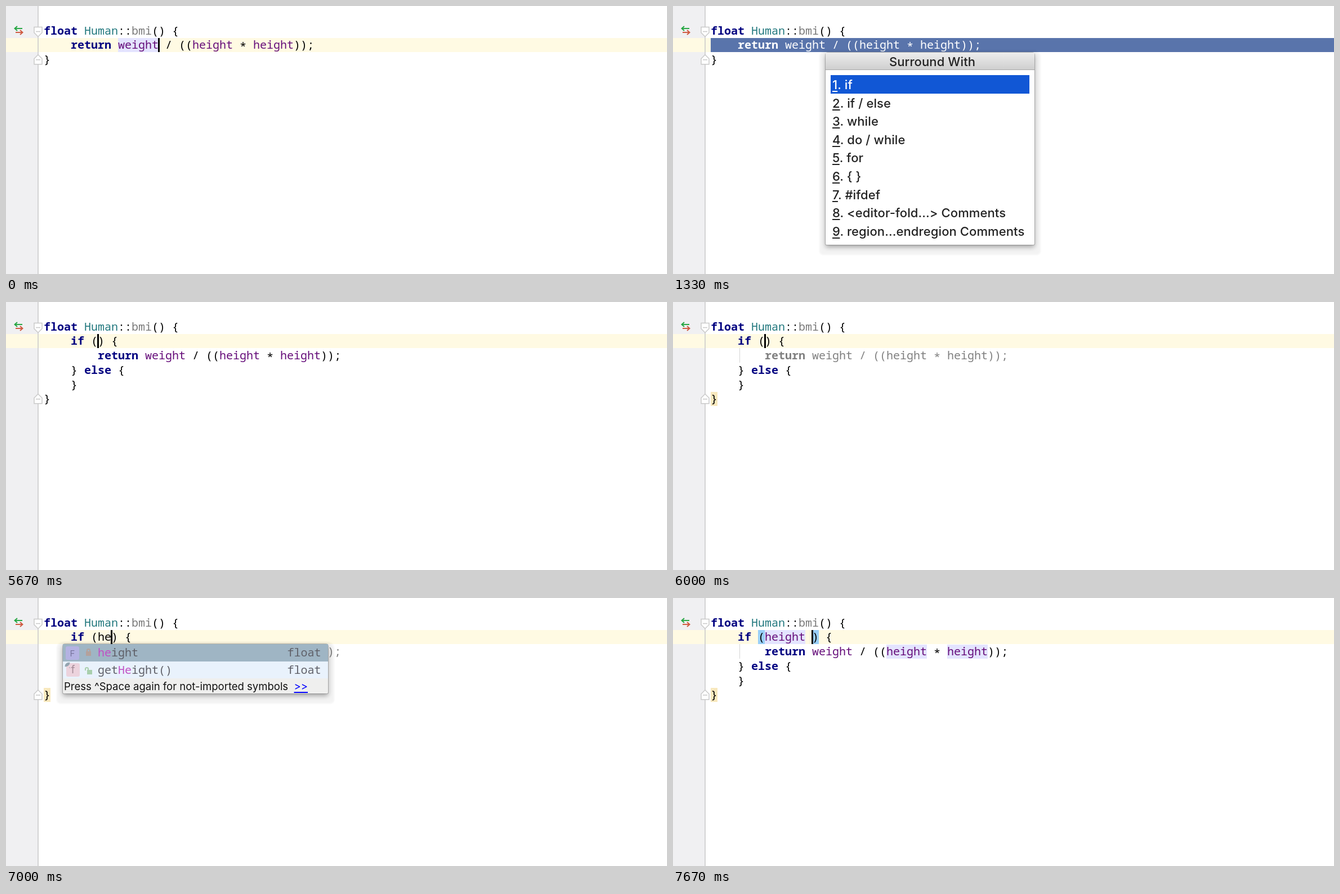
Animation, 1174 px wide and 477 px high, one loop 8 s. Source, as an HTML page:

```html
<!DOCTYPE html>
<html lang="en">
<head>
<meta charset="utf-8">
<title>Surround with if / else</title>
<style>
  html, body { margin: 0; width: 100%; height: 100%; overflow: hidden; background: #fff; }
  #stage { position: relative; width: 1174px; height: 477px; overflow: hidden; }
  #stage div, #stage svg { position: absolute; }
  .code { font: 500 20px/26px "Noto Sans Mono", monospace; white-space: pre; color: #000; }
  .ui { font: 500 22px/32px Inter, sans-serif; letter-spacing: .1px; white-space: pre; color: #222; }
  .note { font: 18.5px/28px Inter, sans-serif; white-space: pre; color: #111; }
  b { font-weight: 700; color: #000080; }
  .class { color: #20777d; }
  .name { color: #7a7a7a; }
  .field { color: #660e7a; }
  .times { position: relative; top: 3px; }
  .dead, .dead * { color: #808080; }
  .selected, .selected * { color: #fff; }
  .popup { box-shadow: 0 0 0 1px #0003, 0 4px 9px #0005, 0 7px 3px 11px #0000000c; border-radius: 4px 4px 2px 2px; }
  .title { background: linear-gradient(#ededed, #cfcfcf); border-bottom: 1px solid #a8a8a8; text-align: center; }
  .hint { color: #5f6068; }
  .hint i { font-style: normal; color: #c050c4; }
  u { text-underline-offset: 3px; text-decoration-thickness: 2px; }
</style>
</head>
<body>
<div id="stage"></div>
<script>
const LEFT = 67, CELL = 12, TOP = 31.3, PITCH = 25.7;
const rowTop = row => TOP + row * PITCH;

const box = (x, y, w, h, fill, inner = '', cls = '') =>
  `<div class="${cls}" style="left:${x}px;top:${y}px;width:${w}px;height:${h}px;background:${fill}">${inner}</div>`;
const text = (x, y, html, cls) => `<div class="${cls}" style="left:${x}px;top:${y}px">${html}</div>`;
const line = (row, html, cls = '') => text(LEFT, rowTop(row) - .6, html, 'code ' + cls);
const mark = (row, col, len, fill) => box(LEFT + col * CELL, Math.round(rowTop(row)), len * CELL, 25, fill);
const caret = col => box(LEFT + col * CELL - 1.5, 57, 3, 25, '#000');
const field = name => `<span class="field">${name}</span>`;

const fold = (y, flip) =>
  `<g transform="translate(57 ${y}) scale(1 ${flip})" fill="#fff" stroke="#c9c9c9" stroke-width="1.5">
    <path d="M-7-8H7V2L0 9L-7 2Z"/><path d="M-4 0H4"/></g>`;

const gutter = endRow => `<svg width="1174" height="477">
  <path d="M57 0V477" stroke="#cbcbcb" stroke-width="1.6"/>
  ${fold(45.5, 1)}${fold(rowTop(endRow) + 13, -1)}
  <g fill="none" stroke-width="2">
    <path d="M29 40H16M20 36L15.5 40L20 44" stroke="#28a745"/>
    <path d="M17 47H29M25 43L29.5 47L25 51" stroke="#cf5b42"/>
  </g></svg>`;

const frame = (endRow, body, selected) =>
  box(0, 0, 57, 477, '#f0f0f2') + box(0, 57, 1174, 25, '#fffae3') +
  (selected ? box(LEFT, 57, 1107, 25, '#5974ab') : '') + gutter(endRow) +
  line(0, '<b>float</b> <span class="class">Human</span>::<span class="name">bmi</span>() {') + body;

const formula = indent => ' '.repeat(indent) +
  `<b>return</b> ${field('weight')} / ((${field('height')} <span class="times">*</span> ${field('height')}));`;

function before({ cursor, menu }) {
  const body = (menu ? '' : mark(1, 11, 6, '#e4e4ff')) +
    line(1, formula(4), menu ? 'selected' : '') + line(2, '}') +
    (cursor ? caret(17) : '') + (menu ? surroundMenu(menu) : '');
  return frame(2, body, menu);
}

const choices = ['if', 'if / else', 'while', 'do / while', 'for', '{ }', '#ifdef',
  '&lt;editor-fold...&gt; Comments', 'region...endregion Comments'];

function surroundMenu(active) {
  const rows = choices.map((label, i) => {
    const n = i + 1, y = 40.5 + i * 32.6;
    const number = active > 1 && n <= active ? n : `<u>${n}</u>`;
    return (n === active ? box(9, Math.floor(y), 353, 33, '#1157d5') : '') +
      text(12, y + .5, `${number}. ${label}`, n === active ? 'ui selected' : 'ui');
  }).join('');
  const title = box(0, 0, 371, 30, '', box(4, 0, 371, 30, '', 'Surround With'), 'ui title');
  return box(271, 83, 371, 342, '#fff', title + rows, 'popup');
}

function after({ typed = '', cursor, dead, brace, guide, matched, popup = '' }) {
  const word = matched ? field(typed) : typed;
  const marks = (brace ? mark(5, 0, 1, '#f8e8bd') : '') +
    (matched ? mark(1, 7, 1, '#99cff8') + mark(1, 8, 6, '#e4e4ff') + mark(1, 15, 1, '#99cff8') +
      mark(2, 26, 6, '#e4e4ff') + mark(2, 35, 6, '#e4e4ff') : '');
  return frame(5, marks +
    (guide ? box(118, 82, 1, 26, '#d4d4d4') : '') +
    line(1, `    <b>if</b> (${word}) {`) + line(2, formula(8), dead ? 'dead' : '') +
    line(3, '    } <b>else</b> {') + line(4, '    }') + line(5, '}') + caret(cursor) + popup);
}

const lock = (x, y, color, open) =>
  `<path d="M${x} ${y}h9v8h-9z" fill="${color}"/>
   <path d="M${x + (open ? -3 : 2)} ${y + 1}v-3q0-2 2.5-2t2.5 2v3" fill="none" stroke="${color}" stroke-width="2"/>`;

const badge = (x, y, fill, letter, ink) =>
  `<rect x="${x}" y="${y}" width="24" height="24" rx="3" fill="${fill}"/>
   <text x="${x + 12}" y="${y + 18}" text-anchor="middle" fill="${ink}">${letter}</text>`;

const emptyPopup = box(101, 82, 471, 165, '#ededec', '', 'popup');
const completion = box(101, 82, 471, 88, '#efefee',
  box(0, 0, 471, 31, '#9fb5c4') + box(0, 31, 471, 30, '#e9f2fc') +
  `<svg width="60" height="62" font-family="Inter, sans-serif">
    <g font-size="15">${badge(5, 4, '#b4b2e2', 'F', '#77739c')}</g>
    <g font-size="19">${badge(6, 34, '#ecd3dd', 'f', '#a58c98')}</g>
    <path d="M4 40Q4 33 12 33Q12 39 4 40M11 41l2 2" fill="#94a5b1" stroke="#94a5b1"/>
    ${lock(41, 13, '#b4a19b')}${lock(43, 46, '#a9cfad', true)}
  </svg>` +
  text(62, 2, '<i>he</i>ight', 'code hint') + text(398.5, 2, 'float', 'code hint') +
  text(62, 33, 'get<i>He</i>ight()', 'code hint') + text(398.5, 33, 'float', 'code hint') +
  text(2, 61, 'Press ^Space again for not-imported symbols  <u style="color:#00f">&gt;&gt;</u>', 'note'),
  'popup');

const DURATION = 8000;
const steps = [
  [0, before({ cursor: true })],
  [660, before({ cursor: false })],
  [1000, before({ cursor: true })],
  [1330, before({ menu: 1 })],
  [5000, before({ menu: 2 })],
  [5670, after({ cursor: 8 })],
  [6000, after({ cursor: 8, dead: true, brace: true, guide: true })],
  [6670, after({ typed: 'h', cursor: 9, dead: true, brace: true, popup: emptyPopup })],
  [7000, after({ typed: 'he', cursor: 10, dead: true, brace: true, popup: completion })],
  [7330, after({ typed: 'height', cursor: 14, dead: true, brace: true })],
  [7670, after({ typed: 'height ', cursor: 15, brace: true, guide: true, matched: true })],
];

const stage = document.getElementById('stage');
const start = performance.now();
let shown;

function play(now) {
  const time = Math.max(0, now - start) % DURATION;
  const step = steps.findLast(([at]) => at <= time);
  if (step !== shown) {
    shown = step;
    stage.innerHTML = step[1];
  }
  requestAnimationFrame(play);
}
play(start);
</script>
</body>
</html>
```
